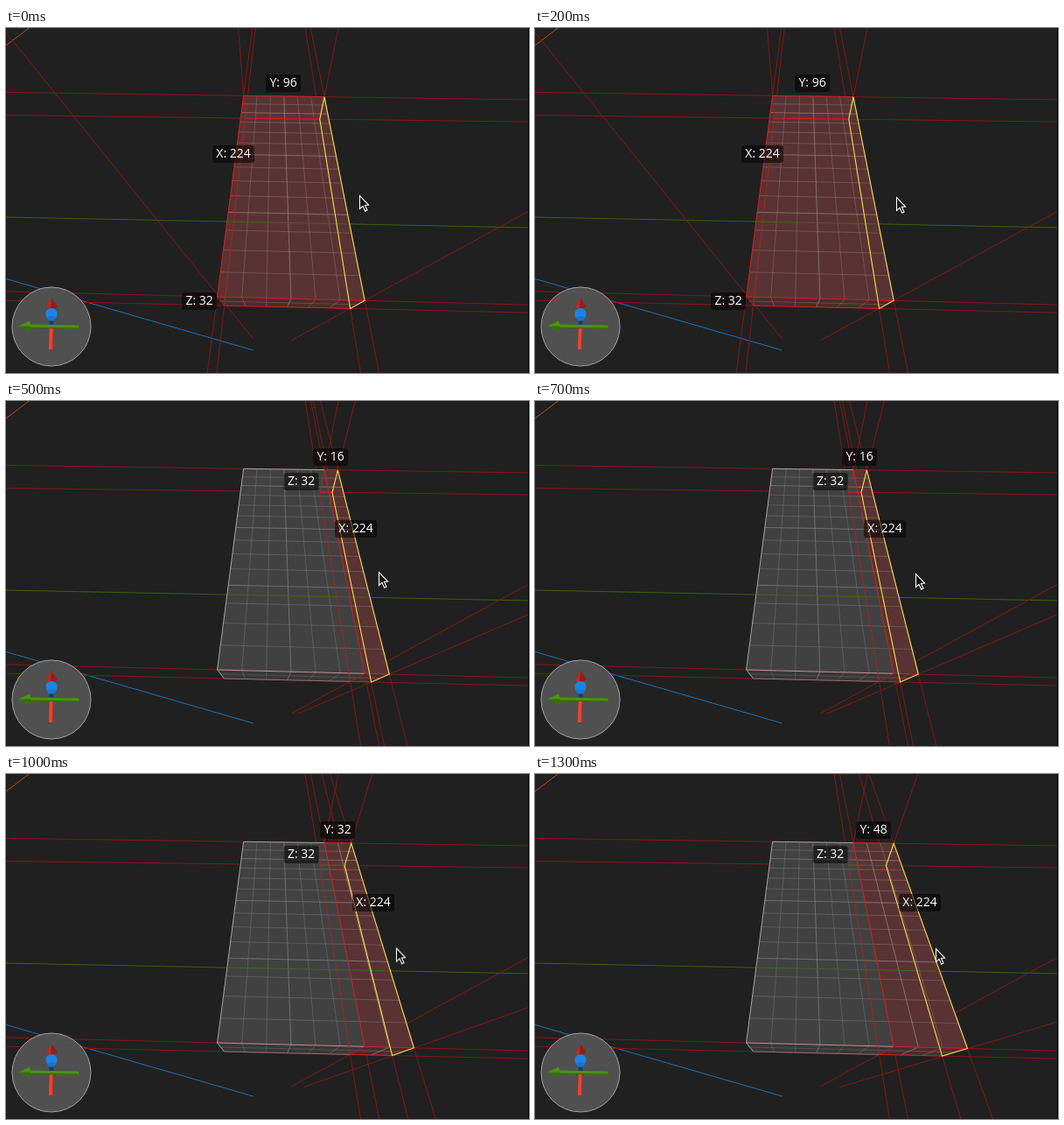
Write an HTML page that moves like this. It is 598x394 px and loops after 3.3 s.

```html
<!DOCTYPE html>
<html lang="en">
<head>
<meta charset="utf-8">
<title>Extruding a brush</title>
<style>
html, body { margin: 0; width: 100%; height: 100%; overflow: hidden; background: #202020; }
svg { display: block; width: 598px; height: 394px; }
line, path { fill: none; stroke-width: 1; }
text { font: 14px "Open Sans", "Noto Sans", sans-serif; fill: #fff; text-anchor: middle; }

.guide { stroke: #821616; }
.edge { stroke: #cf2222; }
.back { stroke: #b81e20; stroke-opacity: .85; }
.face { stroke: #f4e04a; stroke-width: 1.1; }
.plate { fill: #000; fill-opacity: .54; }

.state { visibility: hidden; animation: 3300ms step-end infinite; }
#s6 { animation-name: first; }
#s7 { animation-name: second; }
#s8 { animation-name: third; }
#s9 { animation-name: fourth; }
@keyframes first { 0% { visibility: visible; } 9.0909%, 100% { visibility: hidden; } }
@keyframes second { 0% { visibility: hidden; } 9.0909% { visibility: visible; } 24.2424%, 100% { visibility: hidden; } }
@keyframes third { 0% { visibility: hidden; } 24.2424% { visibility: visible; } 39.3939%, 100% { visibility: hidden; } }
@keyframes fourth { 0% { visibility: hidden; } 39.3939%, 100% { visibility: visible; } }

#cursor { animation: glide 3300ms infinite; }
@keyframes glide {
  0% { transform: translate(404px, 191px); animation-timing-function: steps(2); }
  6.0606% { transform: translate(413px, 193px); animation-timing-function: steps(1); }
  9.0909% { transform: translate(417px, 193px); animation-timing-function: steps(4); }
  21.2121% { transform: translate(435px, 197px); animation-timing-function: steps(1); }
  24.2424% { transform: translate(438px, 198px); animation-timing-function: steps(4); }
  36.3636% { transform: translate(454px, 199px); animation-timing-function: steps(1); }
  39.3939%, 100% { transform: translate(458px, 199px); }
}
</style>
</head>
<body>
<svg viewBox="0 0 598 394">
  <rect width="598" height="394" fill="#202020"/>
  <g transform="translate(-.4 0)">
    <line x1="-1" y1="216" x2="599" y2="228" stroke="#38640f"/>
    <line x1="-1" y1="286" x2="283" y2="368" stroke="#1c71b4"/>
    <line x1="-1" y1="21" x2="28" y2="-1" stroke="#b84c16"/>
    <g id="scene"></g>
  </g>
  <rect x="597" width="1" height="394"/>

  <g id="compass">
    <circle cx="52" cy="341" r="45" fill="#535353" fill-opacity=".95" stroke="#a2a2a2"/>
    <path d="M52 321V341" stroke="#173f6c" style="stroke-width:5"/>
    <path d="M27 340.6L83.5 341.4" stroke="#4a930d" style="stroke-width:4"/>
    <path d="M27 342.2L83.5 343" stroke="#2f6606"/>
    <path d="M14 340.5L27 334.5Q29.5 340.5 27 346.5Z" style="fill:#4a930d"/>
    <path d="M14 340.5L27 346.5Q28.5 344 28.5 340.5Z" style="fill:#346f08"/>
    <path d="M52 343L51.3 367" stroke="#f04432" style="stroke-width:4.6"/>
    <path d="M53.8 343L53.2 367" stroke="#b52d21"/>
    <path d="M52 308.5L45.5 318Q52 323.5 59 318Z" style="fill:#8e201c"/>
    <path d="M52 308.5L45.5 318Q48 320.5 51 320.5Z" style="fill:#b52c25"/>
    <circle cx="52" cy="326.5" r="6.6" fill="#1c83e8"/>
    <path d="M46 330.5Q52 327.5 58 330.5L54.5 334.5H49.5Z" style="fill:#1a74cf"/>
  </g>

  <g id="cursor">
    <path d="M.5 .5V15.5L4 12.3L6.7 18.2L9 17.1L6.4 11.5L10.6 11Z" stroke="#fff" style="fill:#111;stroke-width:1.1"/>
  </g>
</svg>
<script>
const scene = document.getElementById('scene');
const NS = 'http://www.w3.org/2000/svg';

function add(parent, tag, attrs, text) {
  const el = document.createElementNS(NS, tag);
  for (const key in attrs) el.setAttribute(key, attrs[key]);
  if (text) el.textContent = text;
  parent.appendChild(el);
  return el;
}

// Corners of the cross-section at grid column t
const far = t => [272 + 15.4 * t, 77.3 + .22 * t];
const farLow = t => [274 + 14.2 * t, 103 + .18 * t];
const near = t => [242 + 28.1 * t, 307 + .72 * t];
const nearLow = t => [250 + 24 * t, 317 + .56 * t];

const mix = (a, b, k) => a.map((v, i) => v + (b[i] - v) * k);
const atY = (a, b, y) => mix(a, b, (y - a[1]) / (b[1] - a[1]));
const atX = (a, b, x) => mix(a, b, (x - a[0]) / (b[0] - a[0]));

// Perspective position of grid row n of 14, as a fraction from far to near
const row = n => (1 / (1 / 280 - (1 / 280 - 1 / 509) * n / 14) - 280) / 229;

function line(g, a, b, attrs) {
  add(g, 'line', { x1: a[0], y1: a[1], x2: b[0], y2: b[1], ...attrs });
}

function poly(g, points, attrs) {
  add(g, 'path', { d: 'M' + points.map(p => p.join()).join('L') + 'Z', ...attrs });
}

function guides(g, a, b) {
  const style = { class: 'guide' };
  for (const edge of [far, farLow, near, nearLow])
    line(g, atX(edge(0), edge(6), -2), atX(edge(0), edge(6), 600), style);
  for (const t of [a, b]) {
    line(g, atY(far(t), near(t), -2), atY(far(t), near(t), 396), style);
    line(g, atY(farLow(t), nearLow(t), -2), atY(farLow(t), nearLow(t), 396), style);
    line(g, atY(far(t), farLow(t), -2), farLow(t), style);
    line(g, atX(near(t), nearLow(t), t ? 600 : -2), [283 + 7.3 * t, 355 + .3 * t], style);
  }
}

function solid(g, a, b, look) {
  poly(g, [far(a), far(b), near(b), near(a)], { style: `fill:${look.top}` });
  poly(g, [near(a), near(b), nearLow(b), nearLow(a)], { style: `fill:${look.front}` });
  const tone = strong => ({ stroke: look.grid, 'stroke-opacity': strong ? .5 : .28 });
  for (let n = 1; n < 14; n++)
    line(g, mix(far(a), near(a), row(n)), mix(far(b), near(b), row(n)), tone(n % 4 === 2));
  for (let t = a + 1; t < b; t++) {
    line(g, far(t), near(t), tone(t % 4 === 3));
    line(g, near(t), nearLow(t), tone(t % 4 === 3));
  }
  line(g, mix(near(a), nearLow(a), .5), mix(near(b), nearLow(b), .5), tone(false));
}

function greyBox(g) {
  solid(g, 0, 6, { top: '#414141', front: '#373737', grid: '#9a9a9a' });
  const rim = { stroke: '#a6a6a6' };
  line(g, near(0), far(0), rim);
  line(g, far(0), far(6), rim);
  line(g, near(0), nearLow(0), rim);
  line(g, nearLow(0), nearLow(6), { stroke: '#8b7474' });
  line(g, near(0), near(6), { stroke: '#c69090' });
}

function redBox(g, a, b) {
  solid(g, a, b, { top: '#593333', front: '#4b2b2b', grid: '#b5a3a3' });
  const back = { class: 'back' }, edge = { class: 'edge' };
  line(g, farLow(a), farLow(b), edge);
  line(g, farLow(a), nearLow(a), back);
  line(g, far(a), farLow(a), back);
  line(g, far(a), far(b), edge);
  line(g, far(a), near(a), edge);
  line(g, near(a), near(b), edge);
  line(g, near(a), nearLow(a), back);
  line(g, nearLow(a), nearLow(b), edge);
}

function label(g, text, x, y) {
  const w = text.length > 5 ? 48 : 40;
  add(g, 'rect', { class: 'plate', x: x - w / 2, y: y - 10.5, width: w, height: 20, rx: 3 });
  add(g, 'text', { x, y: y + 3.5 }, text);
}

function state(end, yPos, xPos, zPos) {
  const g = add(scene, 'g', { class: 'state', id: 's' + end });
  const start = end > 6 ? 6 : 0;
  guides(g, start, end);
  if (start) greyBox(g);
  redBox(g, start, end);
  line(g, [253, 221.1], [390 + 23 * (end - 6), 223.8 + .46 * (end - 6)], { stroke: '#416a14', 'stroke-opacity': .85 });
  poly(g, [far(end), farLow(end), nearLow(end), near(end)], { class: 'face' });
  label(g, 'Y: ' + (end - start) * 16, ...yPos);
  label(g, 'X: 224', ...xPos);
  label(g, 'Z: 32', ...zPos);
}

state(6, [317.5, 63.5], [260.5, 144.5], [221.5, 312.5]);
state(7, [371.5, 64.5], [400.5, 146.5], [338, 92.5]);
state(8, [379.5, 64.5], [420.5, 147.5], [338, 92.5]);
state(9, [387.5, 64.5], [440.5, 147.5], [338, 92.5]);
</script>
</body>
</html>
```
